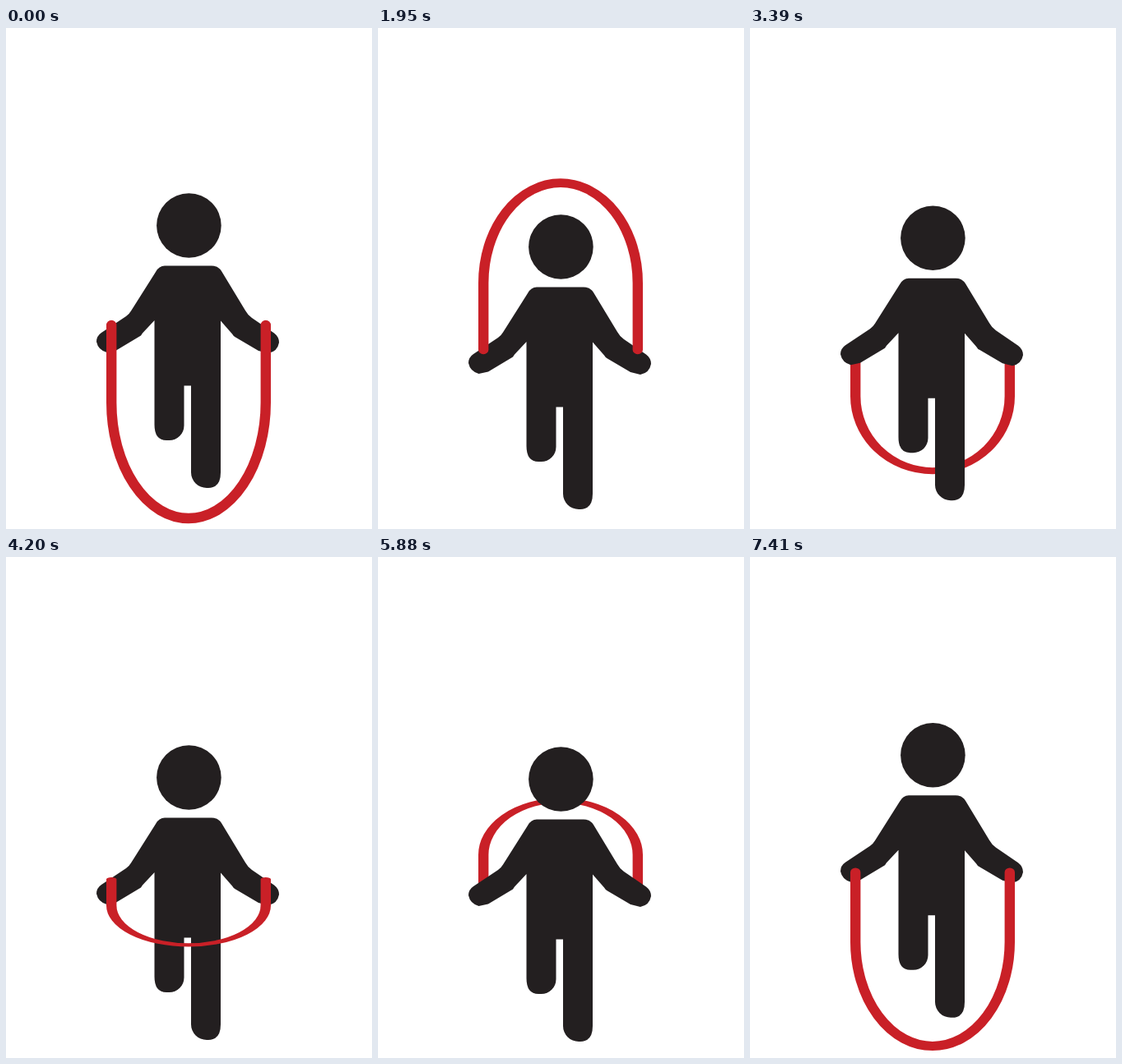
Write an HTML page that moves like this. It is 445 px wide and 610 px high and loops after 7.44 s.

```html
<!DOCTYPE html>
<html>
<head>
<meta charset="utf-8">
<title>Rope skipping</title>
<style>
html, body { margin: 0; width: 100%; height: 100%; overflow: hidden; background: #fff; }
svg { display: block; }
</style>
</head>
<body>
<svg id="stage" width="445" height="610" viewBox="0 0 445 610">
  <g id="body" fill="#231f20">
    <circle cx="222.4" cy="240.5" r="39.3"/>
    <path d="M193 289.5H250Q258 289.5 262 296L291 344Q294 349.500 299 353L326 371.500
      Q332 376 332 383Q330 394 319 396L307 393L279 376.500Q277 376 275 372.500L261 356.500
      V541Q261 560 246 560H244A19 19 0 0 1 225 541V435.500H216.500V484A18 18 0 0 1 198.500 502
      H195Q180.500 502 180.500 483V356L166 371.500L164 374.500L134 392.500L122.500 395
      Q112 392 110 382Q110 375 116 371L146 351Q150 348 152 344.500L182 297Q186 289.500 193 289.500Z"/>
  </g>
  <path id="rope" fill="none" stroke="#c92027" stroke-width="12.4" stroke-linecap="round"
    d="M128.200 6V100A93.800 141 0 0 0 315.800 100V6"/>
</svg>
<script>
const LOOP = 7440, STEP = 30, ROPE_HEIGHT = 247, FALL = 270, LAYER_LAG = 90;
const stage = document.getElementById('stage');
const body = document.getElementById('body');
const rope = document.getElementById('rope');

// Half turns of the rope: even ones go up in front, odd ones come down behind.
const swings = [
  { start: 0, y: [356, 407], reach: 247 },
  { start: 1890, y: [397.5, 381.5], reach: 229 },
  { start: 3660, y: [380, 412], reach: 229 },
  { start: 5370, y: [420, 378], reach: 229 }
];
const jumps = [
  { peak: 0, rise: 1 },
  { peak: 3660, rise: 480 },
  { peak: LOOP, rise: 1140 }
];

const mix = (a, b, f) => a + (b - a) * f;
const swingAt = t => Math.max(0, swings.findLastIndex(s => s.start <= t));

function lift(t) {
  return Math.max(0, ...jumps.map(({ peak, rise }) =>
    1 - (t < peak ? (peak - t) / rise : (t - peak) / FALL)));
}

function draw(now) {
  const t = Math.floor(now % LOOP / STEP) * STEP;
  const k = swingAt(t);
  const { start, y, reach } = swings[k];
  const end = swings[k + 1]?.start ?? LOOP;
  const f = (t - start) / (end - start);
  const side = k % 2 ? -1 : 1;
  const drop = side * mix(reach, -reach, f);
  rope.setAttribute('transform',
    `translate(0 ${mix(...y, f)}) scale(1 ${drop / ROPE_HEIGHT})`);

  // The figure lands a little lower after each half turn.
  const ground = Math.floor(26 + 1.34 * swingAt(t - LAYER_LAG));
  body.setAttribute('transform', `translate(0 ${ground * (1 - lift(t))})`);

  const behind = side < 0 && t - start >= LAYER_LAG && end - t > LAYER_LAG;
  const top = behind ? body : rope;
  if (stage.lastElementChild !== top) stage.append(top);
}

const begin = performance.now();
function tick() {
  draw(performance.now() - begin);
  requestAnimationFrame(tick);
}
tick();
</script>
</body>
</html>
```
